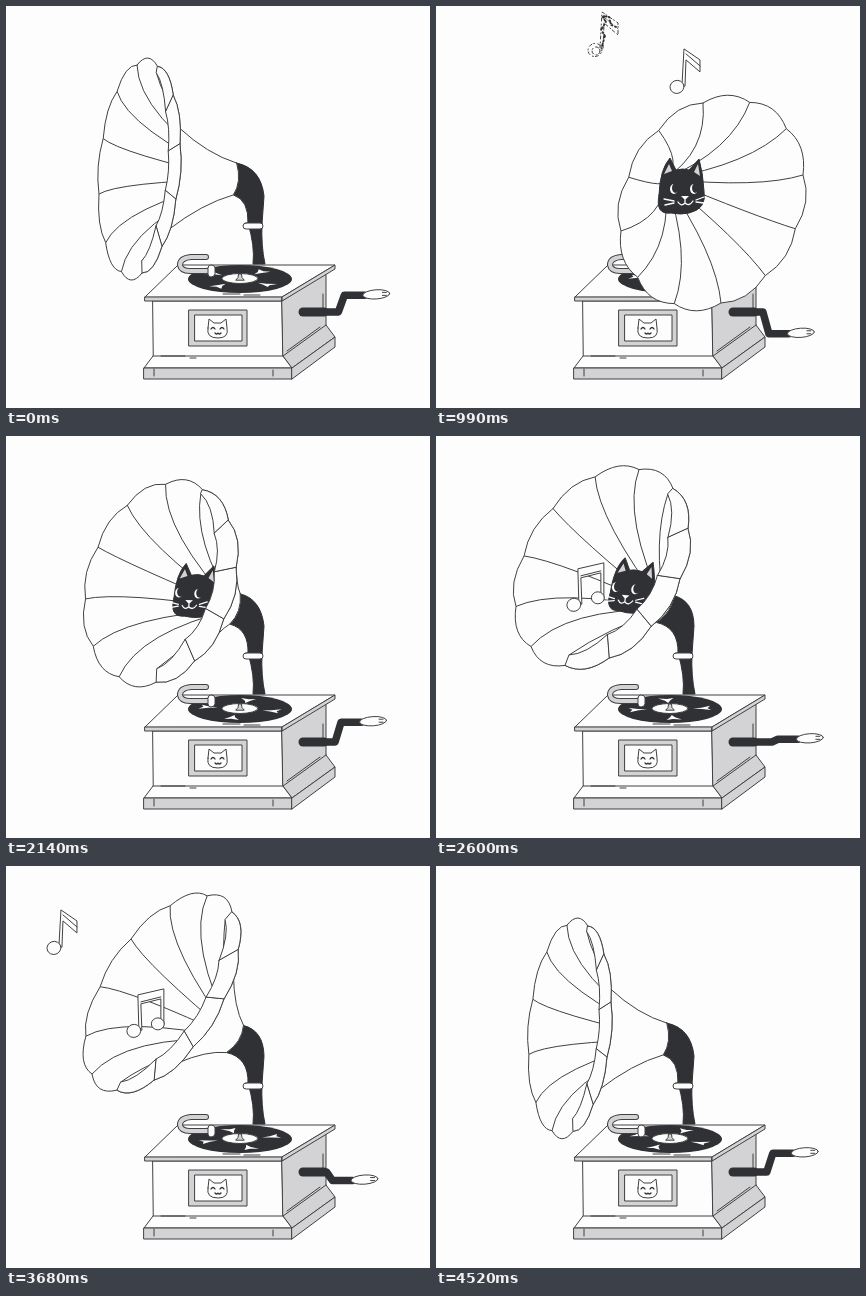
An HTML page with a canvas that plays this animation: 424x402 px, repeating every 4.6 s.

```html
<!DOCTYPE html>
<html lang="en">
<head>
<meta charset="utf-8">
<title>Gramophone</title>
<style>
html, body { margin: 0; width: 100%; height: 100%; overflow: hidden; background: #fdfdfd; }
canvas { display: block; }
</style>
</head>
<body>
<canvas id="stage" width="424" height="402"></canvas>
<script>
const ctx = document.getElementById('stage').getContext('2d');
const LOOP = 4600, PETALS = 12, INK = '#303134', LINE = '#414143', GREY = '#d3d3d6', WHITE = '#fdfdfd';
const THROAT = [229, 173];
const mix = (a, b, k) => a + (b - a) * k;
const mixP = (p, q, k) => [mix(p[0], q[0], k), mix(p[1], q[1], k)];
const clamp = v => Math.max(0, Math.min(1, v));
const smooth = k => (1 - Math.cos(Math.PI * k)) / 2;

// The rim is an ellipse: centre, first half-axis, second half-axis
const side = [133.5, 163, -2.5, -104, 40.5, -25];
const left = [146.5, 159, -22, -92, 65, -51];
const poses = [
  [0, side],
  [450, [143, 168, -22, -92, 65, -51]],
  [990, [276, 197, -9, -100, 91, -28]],
  [1760, left],
  [2600, [166, 131.5, -49, -59, 71, -79]],
  [3060, [143, 120, 0, -41, 60, -77]],
  [3680, [156, 127, -31, -54, 70, -81]],
  [LOOP, side]
];
// x, y, size, sideways look, tilt
const catKeys = [[560, [225, 182, 0, 4, 0]], [880, [245, 185, 1, 4, 0]], [1100, [245, 185, 1, 4, 0]],
  [1760, [184, 163, .95, -6, 0]], [2600, [196, 155, .97, -6, .12]], [2900, [218, 160, 0, -6, .2]]];
// Paired or single, flag slope, then time and head position
const notes = [
  [0, 12, [450, [150, 170]], [990, [159, 44]], [1140, [160, 38]]],
  [0, 12, [760, [246, 155]], [990, [241, 81]], [1440, [236, 32]]],
  [0, -5, [1290, [262, 178]], [1760, [311, 102]], [2010, [334, 65]]],
  [1, 0, [2450, [160, 182]], [2600, [138, 169]], [3060, [77, 86]], [3420, [56, 53]]],
  [0, 12, [3140, [115, 150]], [3680, [48, 82]], [4020, [34, 56]]],
  [1, 0, [3560, [142, 176]], [3680, [128, 165]], [4440, [24, 78]]]
];

function sample(keys, t, ease = k => k) {
  let i = 0;
  while (i < keys.length - 2 && t > keys[i + 1][0]) i++;
  const [ta, a] = keys[i], [tb, b] = keys[i + 1], k = ease(clamp((t - ta) / (tb - ta)));
  return a.map((v, j) => mix(v, b[j], k));
}

function paint(path, fill, stroke = LINE, width = 1) {
  if (fill) { ctx.fillStyle = fill; ctx.fill(path); }
  if (stroke) { ctx.strokeStyle = stroke; ctx.lineWidth = width; ctx.stroke(path); }
}
const draw = (d, fill, stroke, width) => paint(new Path2D(d), fill, stroke, width);
function oval(x, y, rx, ry, fill, stroke, rot = 0) {
  const p = new Path2D();
  p.ellipse(x, y, rx, ry, rot, 0, 7);
  paint(p, fill, stroke);
}

function box() {
  draw('M147 295H276L277 350 286 362H138L147 350Z', WHITE);
  draw('M276 295 320 266V319L329 331 286 362 277 350Z', GREY);
  draw('M147 350H277L320 319', null);
  draw('M138 362H286V373H138Z', GREY);
  draw('M286 362 329 331V341L286 373Z', GREY);
  draw('M139 291 172 259H329L276 291Z', WHITE);
  draw('M139 291H276V295H139ZM276 291 329 259V263L276 295Z', GREY);
  draw('M155 350H179M184 352H190M281 345 314 321M317 288V304M148 363V370M267 364V370', null);
  draw('M183 304H241V340H183Z', GREY);
  draw('M189 309H236V335H189Z', WHITE);
  draw('M202 322 203 313 208 317H215L220 313 221 322Q223 332 212 332 200 332 202 322Z', WHITE);
  draw('M205 323Q207 320 209 323M214 323Q216 320 218 323M209 327Q211 329 212 327 213 329 215 327', null, INK, 1.3);
}

function record(t) {
  oval(234, 273, 52, 14, INK, null);
  ctx.save();
  ctx.translate(234, 273);
  ctx.scale(51, 13.5);
  ctx.rotate(t / LOOP * Math.PI * 4 - .9);
  for (let i = 0; i < 4; i++) {
    ctx.rotate(Math.PI / 2);
    draw('M.45 0 .62 -.05 .8 -.17 .74 0 .8 .13 .62 .05Z', WHITE, null);
  }
  ctx.restore();
  oval(234, 272.5, 18, 5, WHITE, LINE);
  draw('M230 274Q233 272 232.5 268H235.5Q235 272 238 274Z', GREY);
  draw('M217 288H234M238 289H254', null);
  const arm = 'M200 251H185Q174 252 174 259 175 265 184 265H203';
  draw(arm, null, LINE, 6);
  draw(arm, null, GREY, 4);
  draw('M202 262Q202 259 205 259 209 259 209 262V268Q208 271 205 271 202 271 202 268Z', WHITE);
}

function crank(t) {
  const a = -1 + t / LOOP * Math.PI * 4;
  const x = 334 + 8 * Math.cos(a), y = 307 + 21 * Math.sin(a);
  draw(`M298 306 ${x - 6} 306 ${x} ${y} ${x + 20} ${y}`, null, INK, 7.5);
  draw('M297 306H318', null, INK, 9);
  oval(x + 32, y - 1, 13.5, 4.6, WHITE, LINE, -.07);
  draw(`M${x + 38} ${y - 3}h4M${x + 38} ${y}h4`, null);
}

// Curve from p to q, bowed away from the centre
function bow(path, p, q, mid, k) {
  path.quadraticCurveTo(...mixP(mixP(p, q, .5), mid, -k), ...q);
}

function neck(A, B, end) {
  draw('M242 217H256Q255 240 259 258H247Q249 240 242 217Z', INK, INK);
  draw(`M${A}Q${Math.max(255, A[0] + 20)} ${A[1] + 5} 258 190L256 218H242Q243 ${B[1] + 5} ${B}Q${end} ${A}Z`, INK, INK);
  const band = new Path2D();
  band.roundRect(237, 217, 20, 6, 3);
  paint(band, WHITE);
}

function cat(t) {
  const [x, y, size, look, tilt] = sample(catKeys, t, smooth);
  if (size < .01) return;
  ctx.save();
  ctx.translate(x, y);
  ctx.rotate(tilt);
  ctx.scale(size, size);
  draw('M-22 4Q-21 -22 -11 -33L-5 -21Q2 -23 8 -21L18 -32Q22 -18 23 0 26 18 8 22 0 24 -10 22 -26 24 -22 4Z', INK, INK);
  draw('M-17 -17-12 -27-9 -20ZM13 -19 17 -27 19 -15Z', GREY, null);
  ctx.translate(look, 0);
  for (const ex of [-11, 9]) {
    oval(ex, -2, 4, 5, WHITE, null);
    oval(ex + 1.5, -3, 3.5, 5, INK, null);
  }
  draw('M-4 5H4L0 9Z', WHITE, null);
  draw('M0 9V12M-7 11Q-4 16 0 12 4 16 8 10M-21 8-11 10M-20 14-11 12M19 6 11 9M19 12 11 11', null, WHITE, 1.3);
  ctx.restore();
}

function horn(t) {
  const [mx, my, ux, uy, vx, vy] = sample(poses, t, smooth), mid = [mx, my];
  const at = a => [mx + ux * Math.cos(a) + vx * Math.sin(a), my + uy * Math.cos(a) + vy * Math.sin(a)];
  const dx = THROAT[0] - mx, dy = THROAT[1] - my;
  const near = Math.atan2(vx * dx + vy * dy, ux * dx + uy * dy);

  // The lip folds inwards on the side nearest the viewer
  const rim = [], crest = [], fold = [];
  for (let i = 0; i < PETALS; i++) {
    const a = i / PETALS * Math.PI * 2;
    fold[i] = clamp(dx / 40) * clamp(1.2 * Math.cos(a - near));
    rim[i] = at(a);
    crest[i] = mixP(rim[i], mid, .29 * fold[i]);
  }

  const ax = Math.max(dx, 30), r = 16 / Math.hypot(ax, dy);
  const A = [THROAT[0] + dy * r, THROAT[1] - ax * r], B = [THROAT[0] - dy * r, THROAT[1] + ax * r];
  const end = [THROAT[0] + 7, THROAT[1] + 3];
  const top = at(near - .5), low = at(near + .5);
  const axis = mixP(THROAT, mixP(top, low, .5), .5);
  const flare = (p, q) => mixP(mixP(p, q, .5), axis, .25);
  neck(A, B, end);
  draw(`M${A}Q${flare(A, top)} ${top}L${low}Q${flare(low, B)} ${B}Q${end} ${A}Z`, WHITE);

  const outer = new Path2D(), inner = new Path2D();
  outer.moveTo(...rim[0]);
  inner.moveTo(...crest[0]);
  for (let i = 0; i < PETALS; i++) {
    const j = (i + 1) % PETALS;
    bow(outer, rim[i], rim[j], mid, .15);
    bow(inner, crest[i], crest[j], mid, .12);
  }
  paint(outer, WHITE);

  ctx.save();
  ctx.clip(inner);
  crest.forEach((p, i) => {
    const c = mixP(p, mid, .48);
    draw(`M${p}Q${c[0] + dx * fold[i]} ${c[1] + dy * fold[i]} ${THROAT}`, null);
  });
  cat(t);
  ctx.restore();

  for (let i = 0; i < PETALS; i++) {
    const j = (i + 1) % PETALS;
    if (fold[i] + fold[j] < .5) continue;
    const lip = new Path2D();
    lip.moveTo(...rim[i]);
    bow(lip, rim[i], rim[j], mid, .15);
    lip.lineTo(...crest[j]);
    bow(lip, crest[j], crest[i], mid, .12);
    lip.closePath();
    paint(lip, WHITE);
  }
}

function note([pair, slope, ...keys], t) {
  const start = keys[0][0], end = keys[keys.length - 1][0];
  if (t < start || t >= end) return;
  const [x, y] = sample(keys, t), size = clamp((t - start + 30) / 130);
  const fading = end - t < 160, fill = fading ? null : WHITE;
  ctx.save();
  ctx.translate(x, y);
  ctx.scale(size, size);
  if (fading) ctx.setLineDash([3, 2, 1, 3]);
  if (pair) {
    draw('M5 -2 4 -36 30 -42V-8H27V-32L7 -27 8 -1Z', fill);
    draw('M7 -29 27 -34', null);
    oval(24, -7, 6.5, 6, fill, LINE);
  } else {
    draw(`M5 -2 7 -38 23 ${slope - 39}V${slope - 27}L9 -27 8 -1Z`, fill);
    draw(`M9 -33 23 ${slope - 33}`, null);
  }
  oval(0, 0, 7, 6.5, fill, LINE, -.3);
  if (fading) {
    oval(1, 1, 4, 4, null, INK);
    draw('M7 -4 10 -14 6 -20 11 -28 7 -34 14 -33 16 -25 21 -23', null, INK, 1.8);
  }
  ctx.restore();
}

const begin = performance.now();
function frame() {
  const t = (performance.now() - begin) % LOOP;
  ctx.fillStyle = WHITE;
  ctx.fillRect(0, 0, 424, 402);
  ctx.lineCap = ctx.lineJoin = 'round';
  box();
  record(t);
  crank(t);
  horn(t);
  notes.forEach(n => note(n, t));
  requestAnimationFrame(frame);
}
frame();
</script>
</body>
</html>
```
